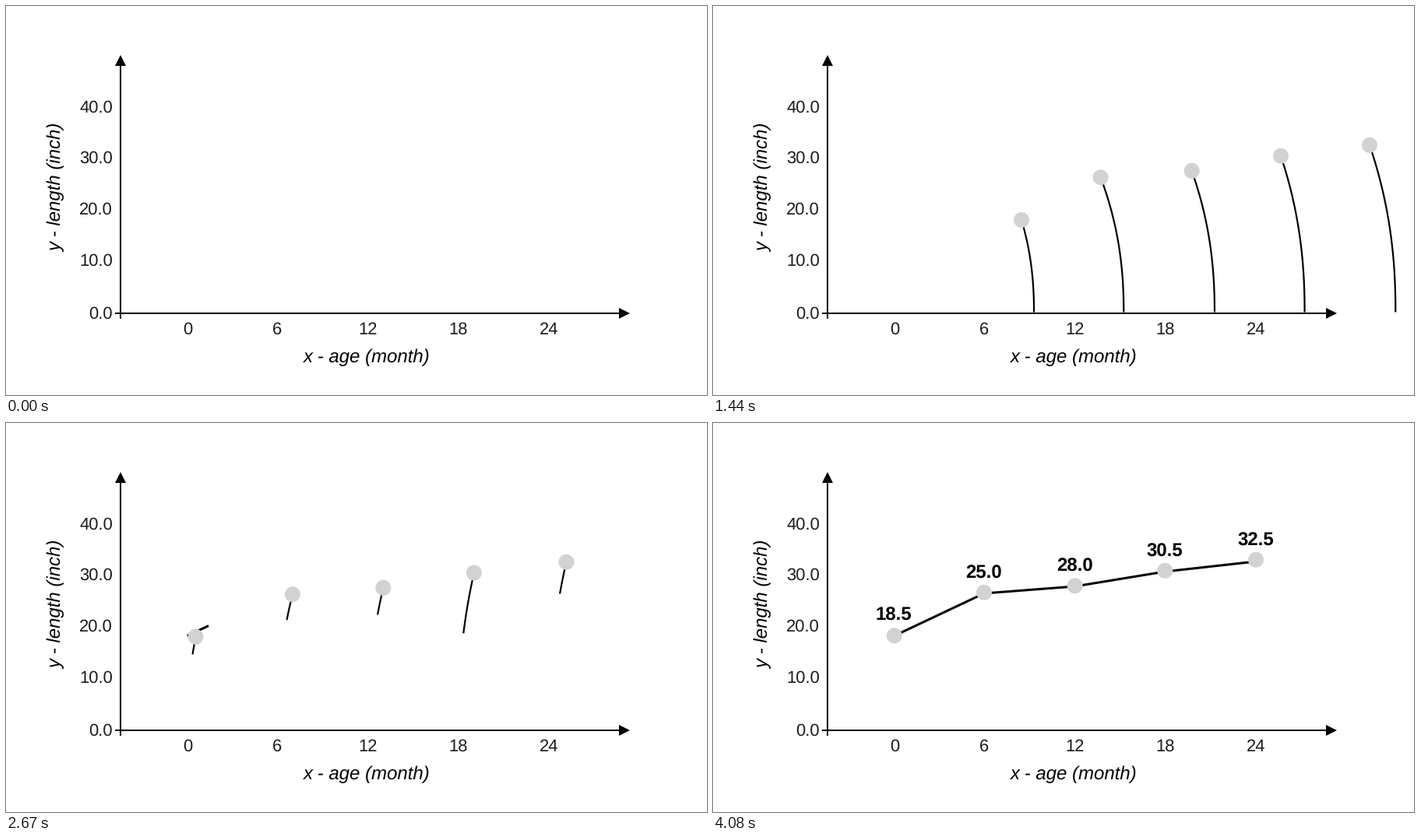
A matplotlib script that plays this animation: 900 px wide and 500 px high, repeating every 6.21 s.

```python
import numpy as np
import matplotlib.pyplot as plt
from matplotlib.animation import FuncAnimation
from matplotlib.patches import Circle, Polygon

W, H, DPI = 900, 500, 100
STEP, FRAMES = 30, 207
PX = 72 / DPI  # points per pixel

AGES = [0, 6, 12, 18, 24]
VALUES = ["18.5", "25.0", "28.0", "30.5", "32.5"]
BASE_X = np.array([232.8, 348, 464.7, 580.3, 697])
HEAD_Y = np.array([273.3, 217.8, 209.3, 189.8, 175.8])
LINE_Y = [273.5, 219, 210, 191, 178]
LABEL_Y = [253.5, 199.5, 190.5, 171.3, 157.3]
GAIN = [0.48, 0.89, 0.88, 0.92, 1.0]  # how far each stem bends
GROUND = 393.5
TICK_COLOR = "#1c1c1c"

plt.rcParams["font.family"] = "Liberation Sans"
plt.rcParams["text.hinting"] = "none"

fig = plt.figure(figsize=(W / DPI, H / DPI), dpi=DPI, facecolor="white")
ax = fig.add_axes([0, 0, 1, 1])
ax.set_xlim(0, W)
ax.set_ylim(H, 0)
ax.axis("off")


def text(x, y, s, size, **kw):
    kw = {"ha": "center", "va": "baseline", "color": "black", **kw}
    return ax.text(x, y, s, fontsize=size * PX, **kw)


def stroke(xs, ys, width, z):
    return ax.plot(xs, ys, color="black", lw=width * PX, zorder=z,
                   solid_capstyle="butt", solid_joinstyle="round")[0]


def draw_axes():
    stroke([147, 147], [70, 402], 2, 1)
    stroke([140, 792], [395, 395], 2, 1)
    for tip in ([(147, 63), (140, 77), (154, 77)],
                [(801, 395), (787, 388), (787, 402)]):
        ax.add_patch(Polygon(tip, fc="black", lw=0))
    for s, y in zip(["40.0", "30.0", "20.0", "10.0", "0.0"],
                    [136.6, 201.8, 267.6, 333.6, 401.6]):
        text(137, y, s, 22, ha="right", color=TICK_COLOR)
    for x, age in zip(BASE_X, AGES):
        text(x, 422, str(age), 22, color=TICK_COLOR)
    text(463, 458, "x - age (month)", 24, style="italic")
    text(71, 233, "y - length (inch)", 24, style="italic",
         rotation=90, rotation_mode="anchor")


draw_axes()
trend = stroke([], [], 3, 3)
stems = [stroke([], [], 2.2, 2) for _ in AGES]
heads = [ax.add_patch(Circle((x, y), 10, fc="#d2d2d2", lw=0, zorder=4))
         for x, y in zip(BASE_X, HEAD_Y)]
labels = [text(x - 0.5, y, s, 24, weight="bold", zorder=5)
          for x, y, s in zip(BASE_X, LABEL_Y, VALUES)]


def sway(t):
    """Sideways bend of the tallest stem: a swing that dies out."""
    phase = np.interp(t, [390, 870, 1440, 1620, 2190, 2670, 3100],
                      [-416, 208, 924, 1151, 1922, 2572, 3144])
    amp = np.interp(t, [2190, 2450, 2700, 3040], [45, 36, 36, 0])
    mid = np.interp(t, [2190, 2450, 2700, 3040], [-15, -6, -6, 0])
    return mid + amp * np.sin(np.radians(phase))


def out_back(u, s=1.5):
    u = np.clip(u, 0, 1) - 1
    return 1 + (s + 1) * u**3 + s * u**2


def draw_stem(i, t):
    shown = t >= 390
    x0 = BASE_X[i] + max(0, 1800 - t) * 0.498
    lean = GAIN[i] * sway(t)
    tall = GROUND - HEAD_Y[i]
    drop = 0.014 * tall * (1 - np.exp(-(lean / tall / 0.06) ** 2))
    top = HEAD_Y[i] + drop
    delay = 90 if i == 3 else 0
    cut = np.clip((t - 2300 - delay) / 457, 0, 1)
    u = np.linspace(cut, 1, 30)
    stems[i].set_data(x0 + lean * u**2.2, GROUND + (top - GROUND) * u)
    stems[i].set_visible(shown and cut < 1)
    heads[i].center = (x0 + lean, top)
    heads[i].set_visible(shown)


def draw_trend(t):
    u = np.clip((t - 2622) / 818, 0, 1)
    tip = BASE_X[0] + u * (BASE_X[-1] - BASE_X[0])
    xs = np.append(BASE_X[BASE_X < tip], tip)
    trend.set_data(xs, np.interp(xs, BASE_X, LINE_Y))
    trend.set_visible(u > 0)


def draw_label(i, t):
    """Pop the value up out of its point."""
    u = (t - 2880 - 90 * i) / 250
    size = out_back(u)
    labels[i].set_visible(u > 0)
    labels[i].set_fontsize(max(1, 24 * size) * PX)
    labels[i].set_y(HEAD_Y[i] + (LABEL_Y[i] - HEAD_Y[i]) * size)


def update(n):
    t = n * STEP
    for i in range(len(AGES)):
        draw_stem(i, t)
        draw_label(i, t)
    draw_trend(t)
    return [trend, *stems, *heads, *labels]


anim = FuncAnimation(fig, update, frames=FRAMES, interval=STEP,
                     init_func=lambda: update(0), repeat=True, repeat_delay=0)
plt.show()
```
